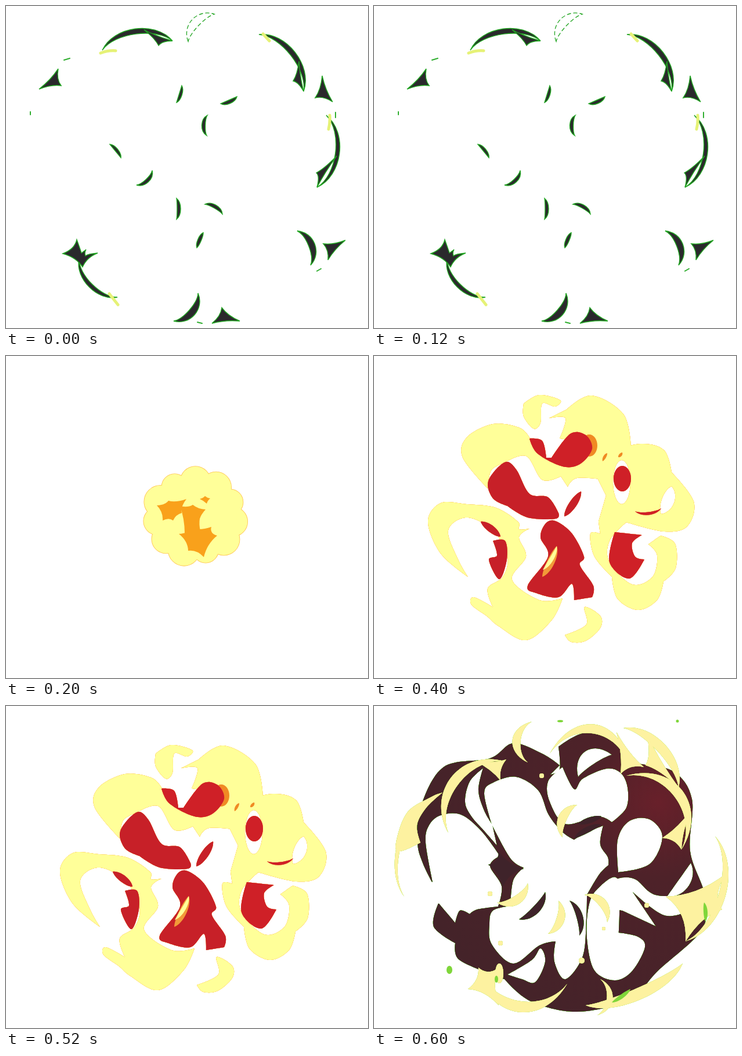
These frames come from a looping animation (624x554 px, 800 ms). An HTML page:

```html
<!DOCTYPE html>
<html lang="en">
<head>
<meta charset="utf-8">
<title>Explosion loop</title>
<style>
html, body { margin: 0; width: 100%; height: 100%; overflow: hidden; background: #fff; }
svg { display: block; width: 100vw; height: 100vh; }
.pose { visibility: hidden; }
</style>
</head>
<body>
<svg id="stage" viewBox="0 0 624 554">
  <defs>
    <radialGradient id="smoke" gradientUnits="userSpaceOnUse" cx="490" cy="165" r="430">
      <stop offset="0" stop-color="#68202a"/>
      <stop offset=".3" stop-color="#4e2229"/>
      <stop offset="1" stop-color="#442329"/>
    </radialGradient>
  </defs>
</svg>
<script>
const NS = 'http://www.w3.org/2000/svg';
const stage = document.getElementById('stage');

function add(parent, tag, attrs) {
  const el = document.createElementNS(NS, tag);
  for (const k in attrs) el.setAttribute(k, attrs[k]);
  return parent.appendChild(el);
}

const parse = text => text.trim().split(/\s+/).map(t => {
  const [x, y] = t.replace('*', '').split(',').map(Number);
  return { x, y, sharp: t.endsWith('*') };
});

// Smooth closed curve; a point ending in * is a sharp corner.
function blob(text) {
  const pts = parse(text), n = pts.length, at = i => pts[(i + n) % n];
  const tangent = i => at(i).sharp ? [0, 0]
    : [(at(i + 1).x - at(i - 1).x) / 6, (at(i + 1).y - at(i - 1).y) / 6];
  let d = `M${pts[0].x} ${pts[0].y}`;
  for (let i = 0; i < n; i++) {
    const a = at(i), b = at(i + 1), s = tangent(i), e = tangent(i + 1);
    d += `C${a.x + s[0]} ${a.y + s[1]} ${b.x - e[0]} ${b.y - e[1]} ${b.x} ${b.y}`;
  }
  return d + 'Z';
}

// Polygon whose sides sag towards its middle.
function spiky(text, sag = .5) {
  const pts = parse(text), n = pts.length;
  const cx = pts.reduce((s, p) => s + p.x, 0) / n, cy = pts.reduce((s, p) => s + p.y, 0) / n;
  return pts.reduce((d, p, i) => {
    const q = pts[(i + 1) % n], mx = (p.x + q.x) / 2, my = (p.y + q.y) / 2;
    return d + `Q${mx + (cx - mx) * sag} ${my + (cy - my) * sag} ${q.x} ${q.y}`;
  }, `M${pts[0].x} ${pts[0].y}`) + 'Z';
}

// Crescent between two tips; outer and inner are the heights of its two edges.
function arc(x1, y1, x2, y2, outer, inner) {
  const dx = x2 - x1, dy = y2 - y1, len = Math.hypot(dx, dy);
  const ctrl = (t, h) => `${x1 + dx * t + dy / len * h * 4 / 3} ${y1 + dy * t - dx / len * h * 4 / 3}`;
  return `M${x1} ${y1}C${ctrl(.2, outer)} ${ctrl(.8, outer)} ${x2} ${y2}C${ctrl(.8, inner)} ${ctrl(.2, inner)} ${x1} ${y1}Z`;
}

const oval = (x, y, rx, ry = rx) =>
  `M${x - rx} ${y}a${rx} ${ry} 0 1 0 ${2 * rx} 0a${rx} ${ry} 0 1 0 ${-2 * rx} 0Z`;

const pose = () => add(stage, 'g', { class: 'pose' });
const fill = (parent, color, shapes) => shapes.forEach(d => add(parent, 'path', { d, fill: color }));
const line = (parent, color, width, d) =>
  add(parent, 'path', { d, fill: 'none', stroke: color, 'stroke-width': width, 'stroke-linecap': 'round' });

function edged(parent, color, blur) {
  const glow = `drop-shadow(0 0 ${blur}px ${color})`;
  return add(parent, 'g', { style: `filter:${glow} ${glow}` });
}

// Solid shapes with holes cut through them.
function cloud(parent, id, color, solids, holes) {
  const mask = add(stage.querySelector('defs'), 'mask',
    { id, maskUnits: 'userSpaceOnUse', x: 0, y: 0, width: 624, height: 554 });
  fill(mask, '#fff', ['M0 0H624V554H0Z']);
  fill(mask, '#000', holes);
  fill(add(parent, 'g', { mask: `url(#${id})` }), color, solids);
}

// Flying debris
const debris = pose();
fill(add(debris, 'g', { stroke: '#22a522', 'stroke-width': 1.4 }), '#2a292c', [
  arc(166, 76, 287, 60, 29, 20), spiky('287,60 263,68 238,41'),
  arc(436, 49, 513, 147, 30, 21), spiky('513,147 495,129 505,95'),
  arc(552, 188, 536, 312, 31, 24), spiky('536,312 535,287 570,258'),
  arc(126, 435, 192, 501, -22, -15), spiky('122,402 130,425 138,419 137,430 158,425 132,449 98,426', .4),
  arc(502, 387, 525, 446, 20, 9), arc(331, 494, 289, 542, 20, 8),
  spiky('545,120 563,165 533,158'), spiky('57,143 90,108 95,137'),
  spiky('547,409 585,403 555,437'), spiky('372,519 403,542 355,546'),
  arc(303, 137, 294, 166, 5, 0), arc(398, 156, 370, 168, 6, 0),
  arc(347, 188, 346, 223, -9, -3), arc(179, 238, 198, 261, 5, 0),
  arc(252, 283, 225, 308, 10, 4), arc(294, 331, 294, 367, 7, 1),
  arc(343, 341, 373, 358, 8, 2), arc(340, 390, 329, 416, -4, 2)
]);
add(debris, 'path', {
  d: arc(314, 61, 359, 14, 21, 6),
  fill: 'none', stroke: '#22a522', 'stroke-width': 1.3, 'stroke-dasharray': '7 4'
});
line(debris, '#e6f277', 5, 'M163 81Q176 76 189 77M443 48L454 60M558 188Q559 200 556 212M178 495L193 514');
line(debris, '#2fae2f', 2, 'M100 93L110 90M42 182V187M568 183V192M536 456L543 452M330 544L338 546');

// Flash: a ring of puffs
const flash = pose();
const puffs = Array.from({ length: 11 }, (_, i) => {
  const a = i / 11 * 2 * Math.PI + .15, r = 25 + 3 * Math.sin(i * 2.4);
  return oval(326 + 66 * Math.cos(a), 276 + 60 * Math.sin(a), r);
});
const body = [...puffs, oval(326, 276, 72, 66)];
fill(add(flash, 'g', { stroke: '#ffc24d', 'stroke-width': 1.6 }), '#ffff99', body);
fill(flash, '#ffff99', body);
fill(flash, '#f9a11b', [
  spiky('260,257 280,249 311,246 303,270 288,283 270,283', .3),
  spiky('300,258 322,256 344,264 334,280 335,302 308,305', .2),
  spiky('298,306 318,296 354,294 364,309 341,346 314,335', .3),
  spiky('334,246 343,241 352,245 346,254', .3)
]);

// Fireball
const fire = pose();
cloud(edged(fire, '#ffb338', .5), 'fireGaps', '#ffff99', [
  blob(`268,140* 250,123 205,117 160,140 153,175 196,228* 202,197 224,184* 262,172 290,213 322,207*
    334,225* 350,210 400,213* 443,157* 430,100 375,68 332,92* 302,107* 330,107 320,142* 345,150 330,178 295,177`),
  blob(`380,200* 400,240* 387,285* 390,306* 373,306 380,345 410,380* 420,418 455,437 488,420 499,388* 520,365
    519,323 494,309* 473,324* 488,343 480,380 445,393 406,355 406,318 435,286* 500,302 540,293 551,250
    513,200* 500,162 460,151 400,165*`),
  blob(`162,380* 115,340 93,285 115,253 160,255 210,261 248,285 250,298 268,297* 250,312 262,345 238,385
    285,420 325,417* 306,455 262,489 215,465 195,448 168,428 172,415 205,432* 196,400 222,380 230,345
    205,300 160,278 128,300 145,350`),
  blob('258,82* 285,67 321,76 312,87 290,82 287,115 275,125 258,104'),
  blob('329,480* 366,462 363,432 390,447 390,468 365,490 340,492')
], [oval(427, 217, 15, 38), arc(513, 224, 495, 272, 14, -8)]);
fill(fire, '#f08a24', [oval(371, 154, 14, 19), arc(394, 181, 402, 167, 3, -2), arc(421, 174, 428, 166, 2, -3)]);
const embers = edged(fire, '#f58a3a', .3);
fill(embers, '#c72028', [
  blob('197,215 225,183 245,195 268,237 300,243 318,270* 313,280 265,278 230,258* 205,245'),
  arc(357, 233, 328, 276, 7, -6),
  blob('296,288 313,284 341,305 362,345 355,360 378,395 376,415* 345,420* 341,392 318,415 280,408 265,395 300,345 287,312'),
  arc(184, 285, 218, 311, 7, -5),
  blob('205,318* 226,318 229,350 216,384 198,351 212,343')
]);
fill(embers, '#cf2027', [
  blob('268,142* 290,146 297,175* 306,175* 338,134 365,136 376,160 355,186 325,190 282,168'),
  oval(428, 211, 15, 22),
  blob('415,303* 462,308* 445,322 450,345 466,350* 440,383 406,355'),
  arc(450, 267, 495, 262, -9, -4)
]);
fill(fire, '#f29a38', [arc(315, 327, 290, 380, 9, -4)]);
fill(fire, '#ffff99', [arc(315, 327, 291, 368, 7, 0)]);

// Smoke ring
const ring = pose();
const shell = edged(ring, '#44d010', .7);
cloud(shell, 'ringGaps', 'url(#smoke)', [
  blob(`75,235 80,175 120,105 200,90 240,64 290,82 320,102* 304,118* 320,108 318,70* 365,46 425,62 445,95
    515,112 548,160 545,250 570,325 565,385 490,455 440,505 350,526 270,508 225,470* 190,457 145,435
    140,408* 103,380 110,342* 125,290 100,303* 84,270`)
], [
  blob(`190,150 205,132 245,122 283,145 301,187 325,217 345,230* 365,218 395,206* 390,238 403,260 404,274*
    388,290 367,325* 366,365 360,430 330,470 311,440 313,405* 285,412 240,443 203,410 199,375 205,352
    235,344* 240,300 258,278* 235,262 203,204*`),
  blob('157,165 165,130 188,107* 180,145 190,180 204,204* 212,240* 190,215 168,190'),
  blob(`89,235 95,205 115,188 150,187 185,215 217,258* 200,275 220,310 214,345* 178,350 165,358* 148,352
    140,373* 112,340* 60,330 60,300 101,303*`),
  blob('230,462* 272,437 287,417 295,440 278,475 255,470'),
  blob('370,345 385,315 420,298 422,390* 455,397 467,415 445,456 415,472 380,455 367,400'),
  blob('390,312 420,297 450,298 485,325 550,328 545,350 500,360 446,320* 486,379* 428,352* 410,345'),
  blob('421,286* 420,230 440,198 475,195 497,225 475,272'),
  blob('300,130 325,105* 345,143 360,125 400,108 425,115 437,140 435,175 410,200* 385,190 330,203 303,165'),
  arc(352, 122, 410, 84, 30, 4),
  arc(546, 270, 505, 328, 20, 0)
]);
fill(shell, '#3f232a', [
  arc(295, 320, 250, 367, 16, 3), arc(337, 335, 354, 395, 15, 4),
  arc(352, 203, 392, 190, 5, -5), arc(345, 228, 392, 204, 8, -2),
  spiky('197,273 215,250 258,280 222,312')
]);
fill(edged(ring, '#b4e65a', .4), '#fdf2a0', [
  arc(128, 218, 225, 95, 55, 38), spiky('228,92 218,128 175,95'),
  arc(118, 149, 52, 328, -43, -36), blob('118,149* 60,180 38,235 45,250 80,235* 74,205 90,175'),
  arc(272, 27, 265, 97, -30, -16),
  arc(303, 82, 440, 108, 64, 48), spiky('465,105 425,117 418,45'),
  arc(430, 38, 525, 140, 33, 16), spiky('525,140 468,102 470,48'),
  arc(435, 120, 530, 247, 62, 45), spiky('530,247 497,227 546,180'),
  arc(588, 224, 537, 405, 45, 33), spiky('503,328 605,290 600,350 537,405'),
  arc(180, 450, 333, 478, -63, -44), spiky('180,450 213,452 215,515 162,487'),
  arc(365, 515, 532, 443, -28, -8), arc(390, 470, 385, 532, 24, 14),
  arc(350, 170, 325, 226, -21, -6), arc(265, 305, 212, 338, 22, 7),
  arc(318, 335, 300, 392, 20, 6), arc(363, 325, 402, 372, 22, 8),
  oval(216, 460, 7, 17), oval(289, 120, 4), oval(200, 323, 4), oval(218, 408, 4),
  oval(358, 438, 5), oval(396, 383, 3), oval(470, 343, 4)
]);
fill(ring, '#7fd63a', [
  arc(410, 510, 442, 487, -5, 2), arc(569, 338, 571, 371, 5, -2), oval(211, 470, 3, 6),
  oval(130, 454, 5, 7), oval(321, 26, 5, 2), oval(523, 26, 2.5)
]);

const poses = [debris, flash, fire, ring];
const HOLD = 200;
const start = performance.now();

function show(now) {
  const current = Math.floor(Math.max(0, now - start) / HOLD) % poses.length;
  poses.forEach((p, i) => { p.style.visibility = i === current ? 'visible' : 'hidden'; });
  requestAnimationFrame(show);
}
show(start);
</script>
</body>
</html>
```
